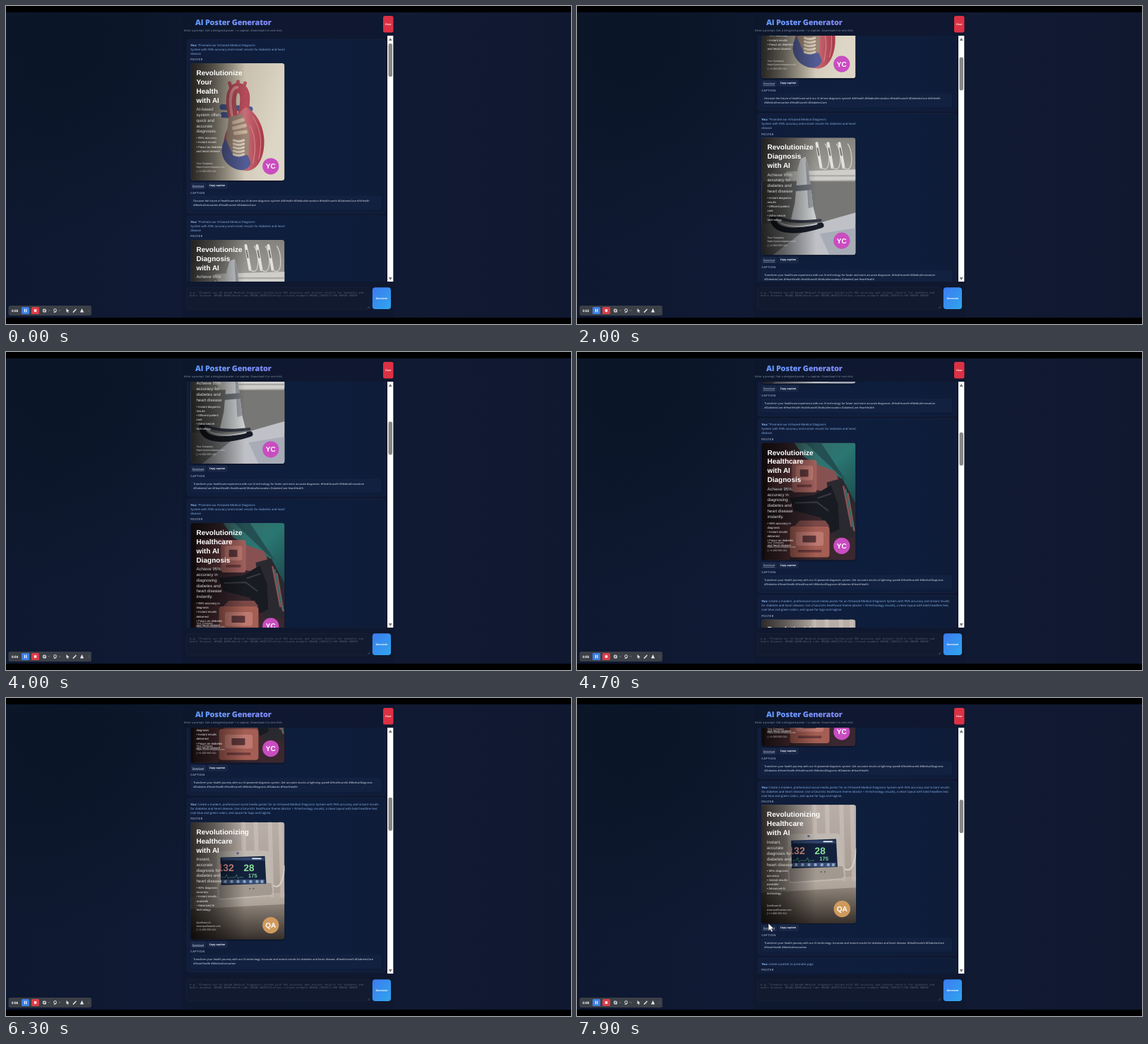
These frames come from a looping animation (800x450 px, 8000 ms). An HTML page:

```html
<!DOCTYPE html>
<html lang="en">
<head>
<meta charset="utf-8">
<title>AI Poster Generator</title>
<style>
  html, body { margin: 0; width: 100%; height: 100%; overflow: hidden; background: #000; }
  svg { display: block; width: 100vw; height: 100vh; }
  text { font-family: "Open Sans", "Noto Sans", sans-serif; text-rendering: geometricPrecision; white-space: pre; }
  .art text { font-family: "Liberation Sans", Arial, sans-serif; }
  text.mono { font-family: "DejaVu Sans Mono", monospace; }
</style>
</head>
<body>
<svg id="stage" viewBox="0 0 800 450" preserveAspectRatio="none">
  <defs>
    <linearGradient id="page"><stop offset="0" stop-color="#0e1830"/><stop offset=".3" stop-color="#101a34"/><stop offset=".72" stop-color="#111a33"/><stop offset="1" stop-color="#0f182f"/></linearGradient>
    <radialGradient id="dusk" gradientUnits="userSpaceOnUse" cx="85" cy="40" r="300"><stop offset="0" stop-color="#0a1526"/><stop offset="1" stop-color="#0a1526" stop-opacity="0"/></radialGradient>
    <linearGradient id="card"><stop offset="0" stop-color="#111d3a"/><stop offset=".6" stop-color="#0d1e3d"/><stop offset="1" stop-color="#0f1c38"/></linearGradient>
    <linearGradient id="title"><stop offset="0" stop-color="#5f98fa"/><stop offset="1" stop-color="#8388f2"/></linearGradient>
    <linearGradient id="go" x2="1" y2="1"><stop offset="0" stop-color="#3d7bf0"/><stop offset="1" stop-color="#2fa6ee"/></linearGradient>
    <linearGradient id="shade"><stop offset="0" stop-color="#000" stop-opacity=".76"/><stop offset=".25" stop-color="#000" stop-opacity=".48"/><stop offset=".58" stop-color="#000" stop-opacity="0"/></linearGradient>
    <linearGradient id="paper" x2="1" y2=".3"><stop offset="0" stop-color="#8a8375"/><stop offset=".55" stop-color="#c9c0ae"/><stop offset="1" stop-color="#ddd6c6"/></linearGradient>
    <linearGradient id="wall" x2="0" y2="1"><stop offset="0" stop-color="#85837d"/><stop offset=".4" stop-color="#a5a49e"/><stop offset="1" stop-color="#7c7d80"/></linearGradient>
    <linearGradient id="room" x2="0" y2="1"><stop offset="0" stop-color="#b9afa8"/><stop offset=".6" stop-color="#a89c93"/><stop offset=".7" stop-color="#8d8278"/><stop offset="1" stop-color="#37302b"/></linearGradient>
    <linearGradient id="red" x2="1"><stop offset="0" stop-color="#a34c58"/><stop offset=".5" stop-color="#c8707a"/><stop offset="1" stop-color="#a83746"/></linearGradient>
    <linearGradient id="teal" x2="1" y2="1"><stop offset="0" stop-color="#3a6464"/><stop offset=".5" stop-color="#2a7772"/><stop offset="1" stop-color="#1c4a4e"/></linearGradient>
    <clipPath id="view"><rect x="250" y="42" width="290" height="348"/></clipPath>
    <clipPath id="frame"><rect width="133" height="166" rx="4"/></clipPath>
  </defs>
</svg>
<script>
const LOOP = 8000, STEP = 100;

const text = (x, y, str, size, fill, more = '') =>
  `<text x="${x}" y="${y}" font-size="${size}" fill="${fill}" ${more}>${str}</text>`;
const rect = (x, y, w, h, fill, r = 0, more = '') =>
  `<rect x="${x}" y="${y}" width="${w}" height="${h}" rx="${r}" fill="${fill}" ${more}/>`;
const shape = (d, fill, more = '') => `<path d="${d}" fill="${fill}" ${more}/>`;
const line = (d, color, w, more = '') =>
  `<path d="${d}" fill="none" stroke="${color}" stroke-width="${w}" stroke-linecap="round" stroke-linejoin="round" ${more}/>`;
const bold = 'font-weight="700"', mid = 'text-anchor="middle"';

// Poster pictures, drawn in a 133 by 166 box
function heart() {
  return rect(0, 0, 133, 166, 'url(#paper)') +
    line('M45 62L84 65M46 73L60 74', '#4a5c92', 8) +
    line('M58 38L55 28M66 34L67 26M74 37L77 28', '#b9525e', 5) +
    line('M62 84C53 50 58 35 67 35C80 35 78 56 73 76', '#b34c58', 14) +
    line('M60 80C52 50 58 34 66 34', '#d8868b', 4) +
    shape('M78 62C96 70 108 98 103 124C99 145 88 154 76 152C62 150 52 140 48 126C43 108 52 82 78 62Z', 'url(#red)') +
    shape('M52 104C41 115 41 133 54 144C66 154 82 154 85 141C81 125 66 112 52 104Z', '#535c94') +
    shape('M54 76L73 72L83 98L82 130L60 130L50 108Z', '#9a8474') +
    line('M61 84L74 80M61 92L77 88M63 99L78 97', '#c9b29c', 5) +
    [109, 114, 119, 124, 129].map(y => line(`M61 ${y}Q68 ${y + 3} 75 ${y}`, '#d9cdb9', 3.4)).join('') +
    line('M88 76C99 92 102 112 96 136M84 88C92 104 93 122 88 142', '#d98b8d', 1);
}
function clinic() {
  const tool = x => line(`M${x} 8L${x + 6} 42`, '#e4e2de', 4) +
    line(`M${x + 1} 15L${x + 3} 25`, '#70716f', 2) +
    line(`M${x + 6} 42C${x + 20} 54 ${x + 20} 20 ${x + 12} 9`, '#cfcec9', 1.3);
  return rect(0, 0, 133, 166, 'url(#wall)') +
    rect(0, 62, 133, 60, '#777876') +
    shape('M34 48L133 45L133 60L40 61Z', '#cfceca') +
    rect(66, 53, 67, 2, '#a9a9a4') +
    [78, 94, 110].map(tool).join('') +
    shape('M70 124L133 106L133 166L16 166Z', '#bfc1c6') +
    shape('M82 136L133 128L133 166L96 166Z', '#a8acb7') +
    shape('M55 30L62 27L66 42L73 98L78 118L41 118L47 92L51 44Z', '#d0d3d5') +
    shape('M62 30L66 42L73 98L66 100Z', '#9ca0a7') +
    shape('M46 68L70 66L71 74L46 76Z', '#73777e') +
    line('M16 114C16 133 48 136 84 124', '#191d28', 8) +
    line('M20 111C34 120 58 120 83 117', '#343946', 4) +
    line('M24 119C38 128 58 127 78 122', '#c8cace', 2);
}
function kit() {
  const box = (x, y, w, h, c) => rect(x, y, w, h, c, 4) +
    rect(x + w * .15, y + h * .18, w * .7, h * .45, '#bd7870', 3) +
    rect(x + w * .32, y + h * .3, w * .34, h * .22, '#5c3639', 1) +
    rect(x + w * .2, y + h * .76, w * .6, h * .08, '#6d3b3c', 1);
  return rect(0, 0, 133, 166, '#38262c') +
    shape('M46 0L133 0L133 86L112 50L76 30L60 20Z', 'url(#teal)') +
    shape('M62 0L84 0L120 54L106 42Z', '#244f52') +
    rect(8, 22, 40, 42, '#6c3f43', 3) +
    shape('M76 30L104 40L112 60L98 72L76 66Z', '#875152') +
    box(43, 24, 35, 46, '#a0605c') +
    shape('M92 56L114 50L133 86L133 134L104 136Z', '#2b2930') +
    line('M116 62L127 118M122 72L131 124', '#8c5252', 2.5) +
    line('M119 66L130 122', '#356c6c', 2) +
    shape('M40 78L74 74L98 60L108 86L110 122L98 128L84 106L46 96Z', '#191b22') +
    line('M48 85L78 84L94 96M80 78L98 72', '#383a43', 2) +
    rect(4, 112, 36, 54, '#533237', 3) +
    box(40, 118, 56, 44, '#a55e53') +
    shape('M46 118L54 110L90 110L96 118Z', '#7c4947') +
    rect(98, 134, 35, 32, '#3a2730');
}
function monitor() {
  const wave = (y, c) => line(`M44 ${y}l5 0l2 -4l2 6l2 -2l8 0l2 -4l2 6l2 -2l5 0`, c, .6);
  return rect(0, 0, 133, 166, 'url(#room)') +
    [74, 92, 112, 127].map(x => line(`M${x} -4L${x + 3} 104`, '#d6ccc5', 6, 'opacity=".45"')).join('') +
    shape('M0 106L133 100L133 116L0 123Z', '#c4b9af', 'opacity=".6"') +
    line('M118 90C128 96 132 76 133 62', '#d7d0c8', 2) +
    shape('M37 45Q37 41 42 41L105 40Q110 40 111 45L117 98Q117 104 111 105L44 110Q38 110 38 104Z', '#c0b9b1') +
    shape('M40 88L114 86L116 98Q116 103 111 103L44 108Q40 108 40 104Z', '#a29990') +
    rect(65, 42.5, 3, 3, '#5c6d91') +
    shape('M42 50L105 48L107 87L43 89Z', '#14213d') +
    rect(44, 50, 60, 4, '#30466d') + rect(44, 81, 61, 6, '#384f79') +
    [47, 56, 65, 74, 83, 92, 99].map(x => rect(x, 82, 4, 4, '#91a7c8', 1)).join('') +
    wave(78, '#56c58c') +
    text(38, 69, '132', 14, '#e59a90', bold) +
    text(75, 69, '28', 13.5, '#8be29b', bold) +
    text(81.5, 78, '175', 7.6, '#79d398', bold) +
    rect(87, 50.5, 13, 2, '#d7deea') +
    [84, 89].map(x => `<circle cx="${x}" cy="94" r="1" fill="#5c554f"/>`).join('');
}

const ours = ['Your Company', 'https://yourcompany.com', '▯ +1 000 555 012'];
const ask = ['"Promote our AI-based Medical Diagnosis', 'System with 95% accuracy and instant results for diabetes and heart', 'disease'];
const cards = [
  { ask, art: heart, head: ['Revolutionize', 'Your', 'Health', 'with AI'],
    sub: ['AI-based', 'system offers', 'quick and', 'accurate', 'diagnoses.'],
    list: ['• 95% accuracy', '• Instant results', '• Focus on diabetes', 'and heart disease'],
    foot: ours, mark: 'YC', hue: '#c94dc0',
    caption: ['Discover the future of healthcare with our AI-driven diagnosis system! #AIHealth #MedicalInnovation #HealthcareAI #DiabetesCare #AIHealth',
      '#MedicalInnovation #HealthcareAI #DiabetesCare'] },
  { ask, art: clinic, head: ['Revolutionize', 'Diagnosis', 'with AI'],
    sub: ['Achieve 95%', 'accuracy for', 'diabetes and', 'heart disease'],
    list: ['• Instant diagnosis', 'results', '• Efficient patient', 'care', '• Advanced AI', 'technology'],
    foot: ours, mark: 'YC', hue: '#c94dc0',
    caption: ['Transform your healthcare experience with our AI technology for faster and more accurate diagnoses. #HealthcareAI #MedicalInnovation',
      '#DiabetesCare #HeartHealth HealthcareAI MedicalInnovation DiabetesCare HeartHealth'] },
  { ask, art: kit, head: ['Revolutionize', 'Healthcare', 'with AI', 'Diagnosis'],
    sub: ['Achieve 95%', 'accuracy in', 'diagnosing', 'diabetes and', 'heart disease', 'instantly.'],
    list: ['• 95% accuracy in', 'diagnosis', '• Instant results', 'delivered', '• Focus on diabetes', 'and heart disease'],
    foot: ours, mark: 'YC', hue: '#c94dc0',
    caption: ['Transform your health journey with our AI-powered diagnosis system. Get accurate results at lightning speed! #HealthcareAI #MedicalDiagnosis',
      '#Diabetes #HeartHealth #HealthcareAI #MedicalDiagnosis #Diabetes #HeartHealth'] },
  { ask: ['Create a modern, professional social media poster for an AI-based Medical Diagnosis System with 95% accuracy and instant results',
      'for diabetes and heart disease. Use a futuristic healthcare theme (doctor + AI technology visuals), a clean layout with bold headline text,',
      'cool blue and green colors, and space for logo and tagline.'],
    art: monitor, head: ['Revolutionizing', 'Healthcare', 'with AI'],
    sub: ['Instant,', 'accurate', 'diagnosis for', 'diabetes and', 'heart disease'],
    list: ['• 90% diagnosis', 'accuracy', '• Instant results', 'available', '• Advanced AI', 'technology'],
    foot: ['Quellivant AI', 'www.quellivantai.com', '▯ +1 000 555 012'], mark: 'QA', hue: '#d09a5d',
    caption: ['Transform your health journey with our AI technology. Accurate and instant results for diabetes and heart disease. #HealthcareAI #DiabetesCare',
      '#HeartHealth #MedicalInnovation'] },
  { ask: ['create a poster to promote yoga'] }
];

function poster(c) {
  let y = 17, out = c.art() + rect(0, 0, 133, 166, 'url(#shade)');
  const block = (rows, size, pitch, fill, more) => {
    rows.forEach((s, i) => out += text(8, y + i * pitch, s, size, fill, more));
    y += (rows.length - 1) * pitch;
  };
  block(c.head, 10, 12.9, '#fff', bold);
  y += 11.5;
  block(c.sub, 6, 7.8, '#d6d6d6');
  y += 8.8;
  block(c.list, 4.2, 6.2, '#e8e8e8');
  y = 142.8;
  block(c.foot, 3.6, 5.4, '#d2d2d2');
  out += `<circle cx="113.3" cy="145.8" r="11.6" fill="${c.hue}"/>` +
    text(113.3, 149.3, c.mark, 10, '#fff', bold + ' ' + mid);
  return `<g class="art" clip-path="url(#frame)">${out}</g>`;
}

function card(c, i) {
  let out = rect(256.3, 0, 280.4, 246, 'url(#card)', 4, 'stroke="#1a2848" stroke-width=".6"');
  c.ask.forEach((s, k) => out += text(261.2, 9.9 + k * 6,
    k ? s : `<tspan ${bold} fill="#93c0fb">You:</tspan> ${s}`, 4.24, '#8cb6ec'));
  const label = (y, s) => text(261.2, y, s, 4, '#9fb2cd', 'font-weight="600" letter-spacing=".45"');
  out += label(12.4 + c.ask.length * 6, 'POSTER');
  if (c.art) {
    out += rect(260.5, 34, 135, 168, '#060b18', 5, 'opacity=".4"') +
      `<g id="poster${i}">${poster(c)}</g>` +
      rect(261.3, 202.8, 22, 9.4, '#1a2747', 2) +
      text(263.8, 208.8, 'Download', 3.45, '#dce5f3', 'text-decoration="underline"') +
      rect(285.3, 202.3, 28.6, 9.4, '#1a2747', 2) +
      text(287.8, 208.2, 'Copy caption', 3.5, '#eef3fb', bold) +
      label(218.6, 'CAPTION') +
      rect(261.5, 222, 269, 18.4, '#132140', 3, 'stroke="#172745" stroke-width=".5"') +
      c.caption.map((s, k) => text(265.3, 229.7 + k * 6, s, 3.8, '#dfe7f3')).join('');
  }
  return `<g transform="translate(0 ${47 + i * 250})">${out}</g>`;
}

function toolbar() {
  const w = '#e6e8ea', caret = x => line(`M${x} 430.5l1 1l1 -1`, '#a5a8ac', .6);
  return rect(3.5, 424, 117.5, 14, '#3b3f46', 2.5) +
    text(8, 432.8, '0:00', 4.6, '#fff', bold + ' id="clock"') +
    rect(22, 426, 11, 10, '#3d7fe6', 1.5) + rect(25.8, 428.7, 1.2, 4.6, '#fff') + rect(28.2, 428.7, 1.2, 4.6, '#fff') +
    rect(36, 426, 11, 10, '#dc3d48', 1.5) + rect(39.8, 429.3, 3.4, 3.4, '#fff') +
    `<circle cx="54.5" cy="431" r="2" fill="none" stroke="${w}" stroke-width="1.1"/>` + line('M53 429l3.2 4', w, .8) + caret(60) +
    `<circle cx="69.5" cy="430.5" r="1.9" fill="none" stroke="${w}" stroke-width="1"/>` + line('M68 433.7l3 -1', w, .9) + caret(75) +
    shape('M85.5 428l4 3.7l-2 .2l1 2l-.9 .4l-.9 -2l-1.2 1.1Z', w) +
    line('M95.5 433l3.4 -3.6', w, 1.5) + shape('M94.7 434l.3 -1.6l1.2 1.2Z', w) +
    shape('M107.5 428l2.6 5.6l-5.2 0Z', w) +
    [429.3, 431, 432.7].map(y => `<circle cx="117" cy="${y}" r=".4" fill="#999"/>`).join('');
}

const stage = document.getElementById('stage');
stage.innerHTML += rect(0, 0, 800, 450, '#000') + rect(0, 9, 800, 432, 'url(#page)') +
  rect(0, 9, 800, 432, 'url(#dusk)') +
  rect(250, 9, 300, 432, '#0b1429', 0, 'opacity=".3"') +
  text(268, 27, 'AI Poster Generator', 10.9, 'url(#title)', 'font-weight="800" letter-spacing="-.2"') +
  text(251.7, 35.6, 'Enter a prompt. Get a designed poster + a caption. Download it in one click.', 4, '#8893a8') +
  rect(534, 14, 14.5, 23.5, '#dc3145', 2.5) +
  text(541.2, 27.1, 'Clear', 3.4, '#fff', bold + ' ' + mid) +
  `<g clip-path="url(#view)"><g id="list">${cards.map(card).join('')}</g></g>` +
  rect(540, 42, 8.3, 348, '#fff') +
  shape('M541.6 49l2.6 -4l2.6 4Z', '#777') + shape('M541.6 384l2.6 4l2.6 -4Z', '#777') +
  rect(541.4, 53, 5.6, 47, '#878787', 2.6, 'id="thumb"') +
  rect(250, 393, 300, 41, '#0f182e', 4) +
  rect(255.5, 398.5, 260.5, 30.5, '#111a2f', 4, 'stroke="#1a2540" stroke-width=".6"') +
  text(260, 406.6, 'e.g. "Promote our AI-based Medical Diagnosis System with 95% accuracy and instant results for diabetes and', 3.87, '#535d73', 'class="mono"') +
  text(260, 411.4, 'heart disease. BRAND_NAME=Nuvok Labs BRAND_WEBSITE=https://nuvok.example BRAND_CONTACT=+00 00000 00000"', 3.87, '#535d73', 'class="mono"') +
  line('M512 427.5l2.5 -2.5M513.6 427.5l.9 -.9', '#69748a', .5) +
  rect(518.8, 398.3, 26.2, 30.6, 'url(#go)', 4) +
  text(531.8, 414.8, 'Generate', 3.6, '#fff', bold + ' ' + mid) +
  toolbar() +
  `<g id="cursor">${shape('M0 0L0 10.5L2.5 8.2L4.2 12L6 11.2L4.4 7.5L7.7 7.3Z', '#fff', 'stroke="#222" stroke-width=".6"')}</g>`;

const $ = id => document.getElementById(id);
// start time, number of steps, position reached
const wheel = [[1400, 5, 99], [2000, 5, 226], [3600, 5, 339], [4300, 5, 452.5], [5500, 5, 584], [6100, 6, 679]];
const ticks = [700, 1700, 3600, 3700, 4700, 5700, 6800, 7800];
const easeOut = x => 1 - (1 - x) ** 2;
const progress = (t, start, n) => Math.max(0, Math.min(1, (Math.floor((t - start) / STEP) + 1) / n));

function draw(t) {
  let pos = 0;
  for (const [start, n, to] of wheel) pos += (to - pos) * easeOut(progress(t, start, n));
  $('list').setAttribute('transform', `translate(0 ${-pos})`);
  $('thumb').setAttribute('y', 53 + pos * .134);
  $('clock').textContent = '0:0' + ticks.filter(x => t >= x).length;

  const move = easeOut(progress(t, 7400, 6));
  $('cursor').setAttribute('visibility', t >= 7400 ? 'visible' : 'hidden');
  $('cursor').setAttribute('transform', `translate(${455 - 184 * move} ${230 + 89 * move})`);

  const zoom = 1 + .011 * progress(t, 7500, 3);
  for (let i = 0; i < 4; i++) {
    const s = i === 3 ? zoom : 1;
    $('poster' + i).setAttribute('transform', `translate(328 117) scale(${s}) translate(-66.5 -83)`);
  }
}

const begin = performance.now();
function tick() {
  draw((performance.now() - begin) % LOOP);
  requestAnimationFrame(tick);
}
tick();
</script>
</body>
</html>
```
